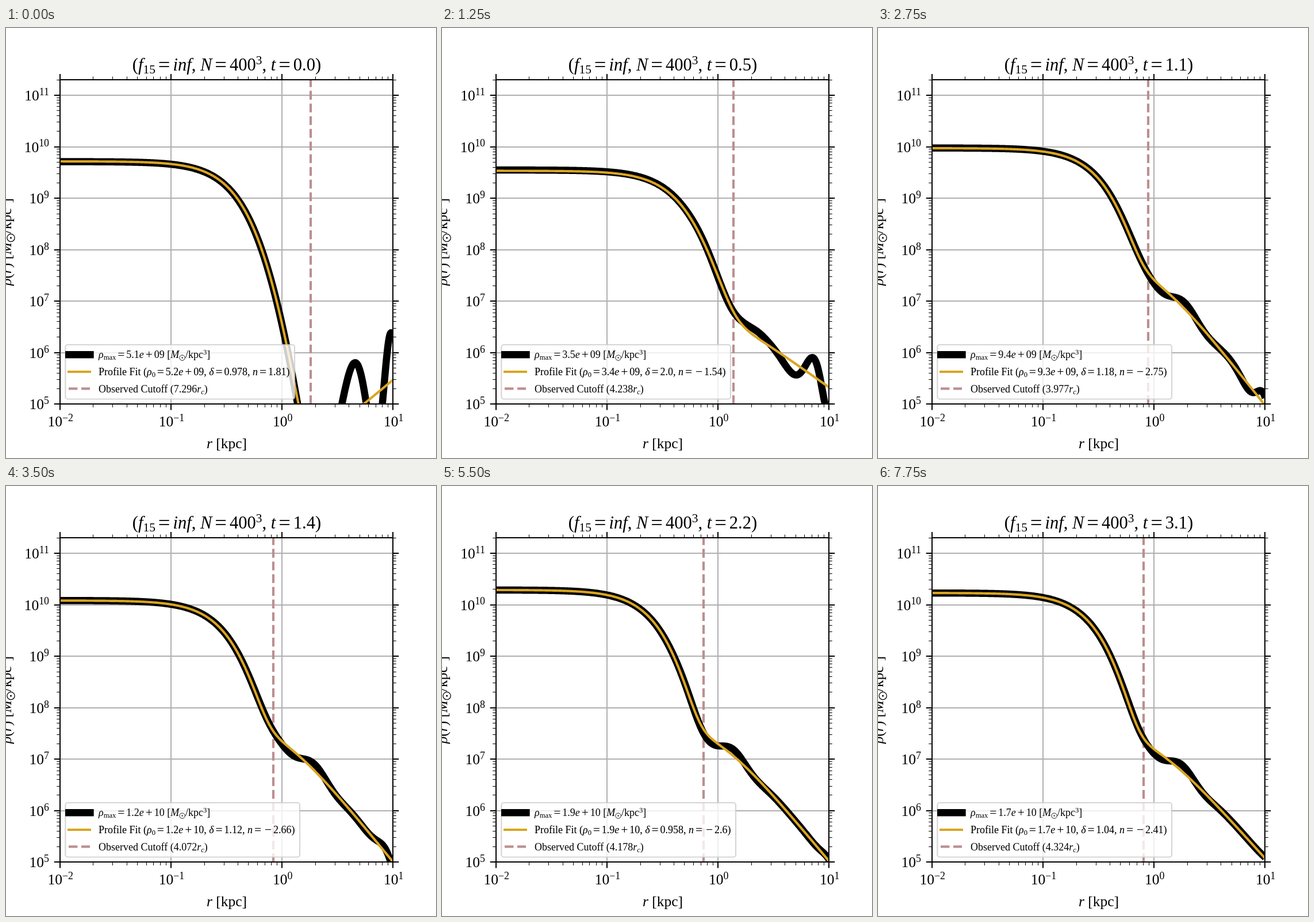
An HTML page with a canvas for the animation above (8000 ms loop, 748 by 748 pixels).

```html
<!DOCTYPE html>
<html lang="en">
<head>
<meta charset="utf-8">
<title>Density profile</title>
<style>
  html, body { margin: 0; width: 100%; height: 100%; overflow: hidden; background: #fff; }
  canvas { display: block; }
</style>
</head>
<body>
<canvas id="stage" width="748" height="748"></canvas>
<script>
const ctx = document.getElementById("stage").getContext("2d");
const LEFT = 93.7, RIGHT = 673.3, TOP = 90, BOTTOM = 654.4;
const X_DECADE = 193.2, Y_DECADE = 89.57;
const STEP_MS = 250, STEPS = 32;
const GRID = "#b0b0b0", GOLD = "#daa520", ROSE = "#bc8f8f";
const THIN = 4.17, THICK = 12.5, DASH = [15.4, 6.67];

const xOf = logR => LEFT + (logR + 2) * X_DECADE;
const yOf = logRho => BOTTOM - (logRho - 5) * Y_DECADE;
const radiusAt = x => 10 ** ((x - LEFT) / X_DECADE - 2);

// Key states; bump is the x of the first shoulder outside the core
const KEYS = [
  { step: 0, peak: 5.14e9, rho0: 5.2e9, cutoff: 7.296, delta: .978, slope: 1.81, bump: 535 },
  { step: 5, peak: 3.53e9, rho0: 3.4e9, cutoff: 4.238, delta: 2, slope: -1.54, bump: 535 },
  { step: 11, peak: 9.4e9, rho0: 9.3e9, cutoff: 3.977, delta: 1.18, slope: -2.75, bump: 537 },
  { step: 17, peak: 1.47e10, rho0: 1.47e10, cutoff: 4.167, delta: 1.06, slope: -2.56, bump: 543 },
  { step: 22, peak: 1.93e10, rho0: 1.93e10, cutoff: 4.178, delta: .958, slope: -2.6, bump: 510 },
  { step: 27, peak: 1.63e10, rho0: 1.63e10, cutoff: 4.194, delta: 1.04, slope: -2.54, bump: 512 },
  { step: 31, peak: 1.69e10, rho0: 1.69e10, cutoff: 4.324, delta: 1.04, slope: -2.41, bump: 532 }
];

function stateAt(step) {
  const i = Math.max(1, KEYS.findIndex(k => k.step >= step));
  const a = KEYS[i - 1], b = KEYS[i];
  const u = (step - a.step) / (b.step - a.step);
  const s = {};
  for (const name in a) s[name] = a[name] + (b[name] - a[name]) * u;
  // Denser cores are smaller; delta widens and softens them
  s.core = .375 * (s.rho0 / 1e9) ** -.25 * (1 + .18 * (s.delta - 1));
  return s;
}

// Solitonic core plus a flattened power-law halo
function profileY(s, rho, x) {
  const r = radiusAt(x);
  const power = 8 - 3 * (s.delta - 1);
  const scale = s.core * (1 - .08 * (s.delta - 1));
  const soliton = rho * (1 + (2 ** (1 / power) - 1) * (r / scale) ** 2) ** -power;
  const shape = q => (1 + (q / .9) ** 2) ** (s.slope / 2);
  const edgeY = Math.max(612, 585 - 26 * s.slope);
  const edge = 10 ** (5 + (BOTTOM - edgeY) / Y_DECADE);
  return yOf(Math.log10(soliton + edge * shape(r) / shape(10)));
}

// Infalling wave that dies out, and a lasting shoulder next to the core
function rippleY(s, x) {
  const r = radiusAt(x), d = x - s.bump;
  const size = 85 * Math.exp(-.13 * s.step) * (r / 10) ** (s.step / 5) * (1 - Math.exp(-((r / 2) ** 6)));
  const infall = size * Math.cos(2 * Math.PI * (r - 4.44 + .48 * s.step) / 5.1);
  const shoulder = 12 * Math.min(1, s.step / 11) * Math.cos(Math.PI * d / 50) * Math.exp(-(((d + 15) / 55) ** 2));
  return -infall - shoulder;
}

function line(x1, y1, x2, y2, color, width, dash = []) {
  ctx.setLineDash(dash);
  ctx.strokeStyle = color;
  ctx.lineWidth = width;
  ctx.beginPath();
  ctx.moveTo(x1, y1);
  ctx.lineTo(x2, y2);
  ctx.stroke();
  ctx.setLineDash([]);
}

// Straight rule aligned to whole pixels
function rule(x1, y1, x2, y2, color, width) {
  const snap = v => width % 2 ? Math.floor(v) + .5 : Math.round(v);
  if (x1 === x2) line(snap(x1), y1, snap(x1), y2, color, width);
  else line(x1, snap(y1), x2, snap(y1), color, width);
}

function curve(yAt, color, width) {
  ctx.strokeStyle = color;
  ctx.lineWidth = width;
  ctx.lineJoin = "round";
  ctx.beginPath();
  for (let x = LEFT - 8; x < RIGHT + 1; x++) ctx.lineTo(x, yAt(x));
  ctx.stroke();
}

// Markup: parts split by |, with marks * italic, _ subscript, ^ superscript, ~ operator
function write(markup, x, y, size, align = 0) {
  let width = 0;
  const parts = markup.split("|").map(part => {
    const [, marks, text] = /^([*_^~]*)(.*)$/.exec(part);
    const has = m => marks.includes(m);
    const scale = has("_") || has("^") ? .7 : has("~") ? 1.2 : 1;
    const font = `${has("*") ? "italic " : ""}${size * scale}px "Liberation Serif", serif`;
    const dy = size * (has("_") ? .17 : has("^") ? -.36 : has("~") ? .05 : 0);
    const gap = has("~") ? size * .16 : 0;
    ctx.font = font;
    const advance = text === "⊙" ? size * .6 : ctx.measureText(text).width;
    const item = { text, font, dy, dx: width + gap };
    width += advance + 2 * gap;
    return item;
  });
  const start = x - width * align;
  ctx.fillStyle = "#000";
  for (const p of parts) {
    ctx.font = p.font;
    if (p.text !== "⊙") {
      ctx.fillText(p.text, start + p.dx, y + p.dy);
      continue;
    }
    const cx = start + p.dx + size * .3, cy = y - size * .02;
    ctx.strokeStyle = "#000";
    ctx.lineWidth = size * .05;
    ctx.beginPath();
    ctx.arc(cx, cy, size * .26, 0, 7);
    ctx.stroke();
    ctx.beginPath();
    ctx.arc(cx, cy, size * .06, 0, 7);
    ctx.fill();
  }
  return start + width;
}

function eachTick(from, to, draw) {
  for (let d = from; d <= to; d++)
    for (let k = 1; k < 10; k++) {
      const value = d + Math.log10(k);
      if (value <= to + 1e-9) draw(value, k === 1);
    }
}

function grid() {
  for (let d = -1; d <= 0; d++) rule(xOf(d), TOP, xOf(d), BOTTOM, GRID, 2);
  for (let d = 6; d <= 11; d++) rule(LEFT, yOf(d), RIGHT, yOf(d), GRID, 2);
}

function axes() {
  eachTick(-2, 1, (v, major) => {
    const x = xOf(v), len = major ? 10 : 5.5, w = major ? 2 : 1;
    rule(x, TOP, x, TOP - len, "#000", w);
    rule(x, BOTTOM, x, BOTTOM + len, "#000", w);
    if (major) write(`10|^${String(v).replace("-", "−")}`, x + 1, 693, 25.5, .5);
  });
  eachTick(5, 5 + (BOTTOM - TOP) / Y_DECADE, (v, major) => {
    const y = yOf(v), len = major ? 10 : 5.5, w = major ? 2 : 1;
    rule(LEFT, y, LEFT - len, y, "#000", w);
    rule(RIGHT, y, RIGHT + len, y, "#000", w);
    if (major) write(`10|^${v}`, 75, y + 9, 25.5, 1);
  });
  ctx.strokeStyle = "#000";
  ctx.lineWidth = 2;
  ctx.strokeRect(94, 90, 579, 564);
  write("*r| [kpc]", 384, 731, 25.5, .5);
  ctx.save();
  ctx.translate(9, 372);
  ctx.rotate(-Math.PI / 2);
  write("*ρ|(|*r|) [|*M|⊙|/kpc|^3|]", 0, 0, 25.5, .5);
  ctx.restore();
}

const scientific = v => {
  const [mantissa, exponent] = v.toExponential(1).split("e+");
  return `${mantissa}|*e|~+|${exponent.padStart(2, "0")}`;
};
const short = v => {
  const text = String(+Math.abs(v).toPrecision(3));
  return (v < 0 ? "~−|" : "") + (text.includes(".") ? text : text + ".0");
};

function legend(s) {
  const fit = `Profile Fit (|*ρ|_0|~=|${scientific(s.rho0)}|, |*δ|~=|${short(s.delta)}|, |*n|~=|${short(s.slope)}|)`;
  const right = write(fit, 161, 604, 18) + 8.5;
  ctx.beginPath();
  ctx.roundRect(103.3, 551, right - 103.3, 94.5, 4);
  ctx.fillStyle = "rgba(255,255,255,.8)";
  ctx.fill();
  ctx.strokeStyle = "rgba(204,204,204,.8)";
  ctx.lineWidth = 2.2;
  ctx.stroke();
  line(103, 568.3, 152.7, 568.3, "#000", THICK);
  line(107, 598, 148, 598, GOLD, THIN);
  line(109, 627.3, 146, 627.3, ROSE, THIN, DASH);
  write(`*ρ|_max|~=|${scientific(s.peak)}| [|*M|⊙|/kpc|^3|]`, 161, 574, 18);
  write(fit, 161, 604, 18);
  write(`Observed Cutoff (${s.cutoff.toFixed(3)}|*r|_*c|)`, 161, 634, 18);
}

function draw(step) {
  const s = stateAt(step);
  ctx.fillStyle = "#fff";
  ctx.fillRect(0, 0, 748, 748);

  ctx.save();
  ctx.beginPath();
  ctx.rect(LEFT, TOP, RIGHT - LEFT, BOTTOM - TOP);
  ctx.clip();
  grid();
  const cutX = Math.round(xOf(Math.log10(s.core * s.cutoff)));
  line(cutX, BOTTOM, cutX, TOP, ROSE, THIN, DASH);
  curve(x => profileY(s, s.peak, x) + rippleY(s, x), "#000", THICK);
  curve(x => profileY(s, s.rho0, x), GOLD, THIN);
  ctx.restore();

  axes();
  legend(s);
  write(`(|*f|_15|~=|*inf|, |*N|~=|400|^3|, |*t|~=|${(step / 10).toFixed(1)}|)`, 384, 74, 30.6, .5);
}

function frame() {
  draw(Math.floor(performance.now() / STEP_MS) % STEPS);
  requestAnimationFrame(frame);
}
frame();
</script>
</body>
</html>
```
